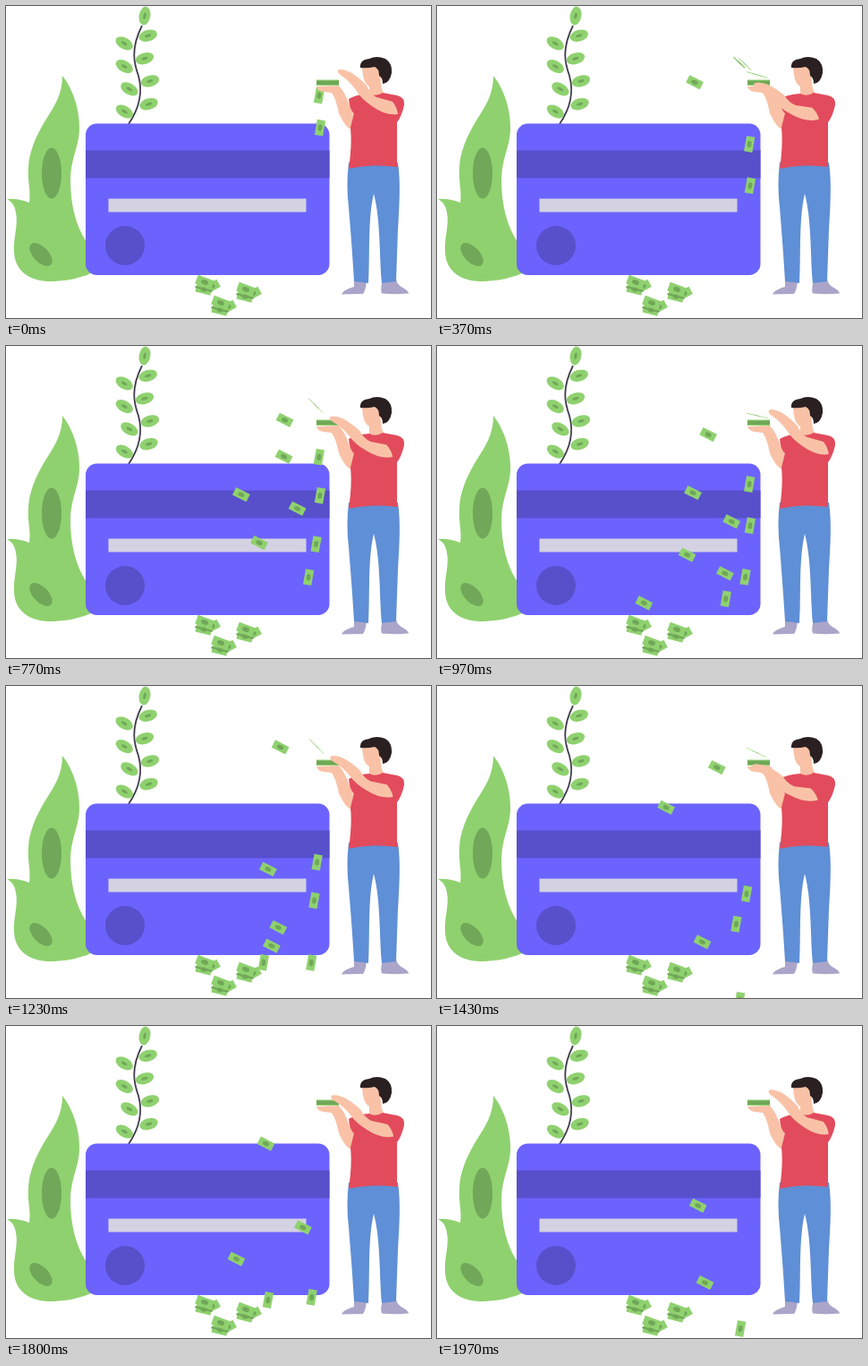
Animation of 475x349 px, one loop 2010 ms. Source, as an HTML page:

```html
<!DOCTYPE html>
<html lang="en">
<head>
<meta charset="utf-8">
<title>Cash on a card</title>
<style>
  html, body { margin: 0; width: 100%; height: 100%; overflow: hidden; background: #fff; }
  svg { display: block; width: 475px; height: 349px; }
  .leaf { fill: #8fd16f; }
  .vein { fill: #70a758; }
  .card { fill: #6c63ff; }
  .shade { fill: #584fcb; }
  .skin { fill: #f9c2a7; }
  .shirt { fill: #e24b5c; }
  .jeans { fill: #5f8fd6; }
  .shoe { fill: #aaa5c9; }
  .hair { fill: #2b2021; }
</style>
</head>
<body>
<svg viewBox="0 0 475 349">
  <defs>
    <g id="bill">
      <rect class="leaf" x="-8.7" y="-4.7" width="17.4" height="9.4"/>
      <ellipse class="vein" rx="3.7" ry="2.4"/>
    </g>
    <g id="heap">
      <use href="#bill" transform="translate(6 2) rotate(-28)"/>
      <use href="#bill" transform="translate(-3 5) rotate(14)"/>
      <path class="vein" d="M-12 1L7 6L6 8L-13 3Z"/>
      <use href="#bill" transform="translate(-2 -3) rotate(20) scale(1.1)"/>
    </g>
    <g id="sprout">
      <ellipse class="leaf" rx="10.5" ry="6.3"/>
      <ellipse class="vein" rx="3.6" ry="1.6"/>
    </g>
  </defs>

  <!-- big plant -->
  <path class="leaf" d="M63 78C75 93 83 117 82 140C81 158 72 172 72 195C72 222 78 246 90 264L95 299C79 306 62 308 48 308C25 307 10 296 9 275C8 258 14 245 11 231C10 224 7 219 1 216Q13 215 26 220C28 207 24 196 25 183C25 165 33 146 44 128C55 111 63 98 63 78Z"/>
  <ellipse class="vein" cx="51" cy="187" rx="11" ry="28.5"/>
  <ellipse class="vein" rx="16" ry="8.5" transform="translate(39 278) rotate(46)"/>

  <!-- sprig -->
  <path id="stem" d="M137 132C150 113 153 96 148 78C143 64 139 48 152 22" fill="none" stroke="#3f3d4a" stroke-width="1.8"/>
  <use href="#sprout" transform="translate(155 11) rotate(-80)"/>
  <g id="sprig"></g>

  <!-- card -->
  <rect class="card" x="89" y="131.500" width="272.500" height="169.500" rx="12.500"/>
  <rect class="shade" x="89" y="161.500" width="272.500" height="31"/>
  <rect x="114.500" y="215.500" width="221" height="15" fill="#d4d2e2"/>
  <circle class="shade" cx="133" cy="268" r="22"/>

  <use href="#heap" x="224" y="312"/>
  <use href="#heap" x="270" y="320"/>
  <use href="#heap" x="242" y="335"/>
  <g id="bills"></g>

  <!-- man -->
  <path class="shoe" d="M389 307L403 308Q402 318 399 322L375 322.500Q376 318 389 314Z"/>
  <path class="shoe" d="M421 307L436 306Q437 312 445 316Q450 319 450 321.500Q434 323 420 321.500Q418 316 421 307Z"/>
  <path class="jeans" d="M383 175L438 175C441 195 440 220 438 250L436 308L420 310C417 280 419 240 411 210C404 240 407 280 405 310L389 308C387 275 385 250 383 225Q380 200 383 175Z"/>
  <path class="skin" d="M398 65L418 65L419 86Q420 97 425 101L406 103L406 90Q398 86 398 65Z"/>
  <path class="hair" d="M396 69Q395 60 406 59Q414 55 424 59Q432 64 431 75Q429 86 421 87Q421 80 417 78Q417 70 412 68Q404 70 396 69Z"/>
  <path class="skin" d="M347 90L372 89Q380 98 384 112L390 112Q390 132 385 137Q380 137 372 120Q369 104 364 97L355 96Q348 95 347 90Z"/>
  <path class="shirt" d="M383 104Q391 99 406 98Q413 102 421 97L437 100Q446 102 445 111Q442 124 437 130L437 180Q409 176 383 182Q387 155 385 136L389 120Q384 116 383 104Z"/>
  <rect class="leaf" x="347" y="82.500" width="25" height="6.500"/>
  <rect class="vein" x="347" y="83.500" width="25" height="4.500"/>
  <path id="arm" class="skin" d="M371 72Q373 69 385 74Q396 81 403 89Q407 98 414 102L432 107Q437 113 438 121Q424 123 409 112Q397 104 391 94Q384 84 375 78Q370 75 371 72Z"/>
</svg>
<script>
const LOOP = 2010;
const APEX = 230; // age in ms at which a tossed bill starts to fall
const arm = document.getElementById('arm');
const stem = document.getElementById('stem');

const mix = (a, b, s) => a + (b - a) * s;
const ramp = (from, to, t) => Math.min(1, Math.max(0, (t - from) / (to - from)));
const ease = s => (1 - Math.cos(s * Math.PI)) / 2;

function addUse(parent, id) {
  const el = document.createElementNS('http://www.w3.org/2000/svg', 'use');
  el.setAttribute('href', '#' + id);
  return document.getElementById(parent).appendChild(el);
}

// Leaves alternate along the stem
for (let i = 0; i < 8; i++) {
  const isRight = i % 2;
  const { x, y } = stem.getPointAtLength(16 + 26 * (i >> 1) + 9 * isRight);
  addUse('sprig', 'sprout').setAttribute('transform',
    `translate(${x + (isRight ? 11.5 : -12.5)} ${y}) rotate(${isRight ? -16 : 30})`);
}

// Sways from one turning point [age, x] to the next
function sway(turns, age) {
  return turns.slice(1).reduce(
    (x, [end, to], i) => mix(x, to, ease(ramp(turns[i][0], end, age))), turns[0][1]);
}

// Flicked up edge-on, then opens and flutters down
function toss(turns, speed) {
  return {
    from: -30,
    to: turns[turns.length - 1][0],
    pose(age) {
      const open = ramp(165, 235, age);
      return {
        x: sway(turns, age),
        y: age < APEX ? mix(78, 58, age / APEX) : 58 + speed * (age - APEX),
        angle: mix(Math.min(45, 13 + 0.29 * age), 27, open),
        sx: mix(1.4, 1, ramp(110, 170, age)),
        sy: mix(0.07, 1, open)
      };
    }
  };
}

// Slides off the hand and drops
function slip(to, x, y) {
  return {
    from: 0,
    to,
    pose: age => ({ x: x(age), y: y(age), angle: 100, sx: 1, sy: 1 })
  };
}

const left = toss([[50, 358], [470, 256], [710, 283], [980, 222]], 0.337);
const middle = toss([[0, 358], [490, 286], [735, 305], [900, 272]], 0.407);
const right = toss([[0, 358], [380, 310], [680, 332], [1000, 278]], 0.363);
const drop = slip(1440,
  t => 350 - 5.8e-6 * t * t,
  t => 100 + 0.137 * t + 2.7e-5 * t * t);
const drift = slip(1340,
  t => 351 - 63 * (t / 1230) ** 3.4,
  t => 136 + 0.19 * t - 4e-5 * t * t);

const bills = [];
function addBill(flight, start) {
  bills.push({ flight, start, el: addUse('bills', 'bill') });
}
for (const start of [0, 600]) {
  addBill(drop, start);
  addBill(drift, start);
}
for (const start of [0, 160, 910]) {
  addBill(left, start + 60);
  addBill(right, start + 200);
  addBill(middle, start + 480);
}

function placeBill({ flight, start, el }, t) {
  const age = t - start;
  const shown = age >= flight.from && age < flight.to;
  el.style.display = shown ? '' : 'none';
  if (!shown) return;
  const { x, y, angle, sx, sy } = flight.pose(age);
  el.setAttribute('transform', `translate(${x} ${y}) rotate(${angle}) scale(${sx} ${sy})`);
}

function draw(now) {
  const t = now % LOOP;
  const p = ease(t / LOOP * 4); // two arm swings per loop
  arm.setAttribute('transform', `translate(${-13 * p} ${7 * p}) rotate(${-9 * p} 437 121)`);
  bills.forEach(bill => placeBill(bill, t));
}

const begin = performance.now();
function tick() {
  draw(performance.now() - begin);
  requestAnimationFrame(tick);
}
tick();
</script>
</body>
</html>
```
